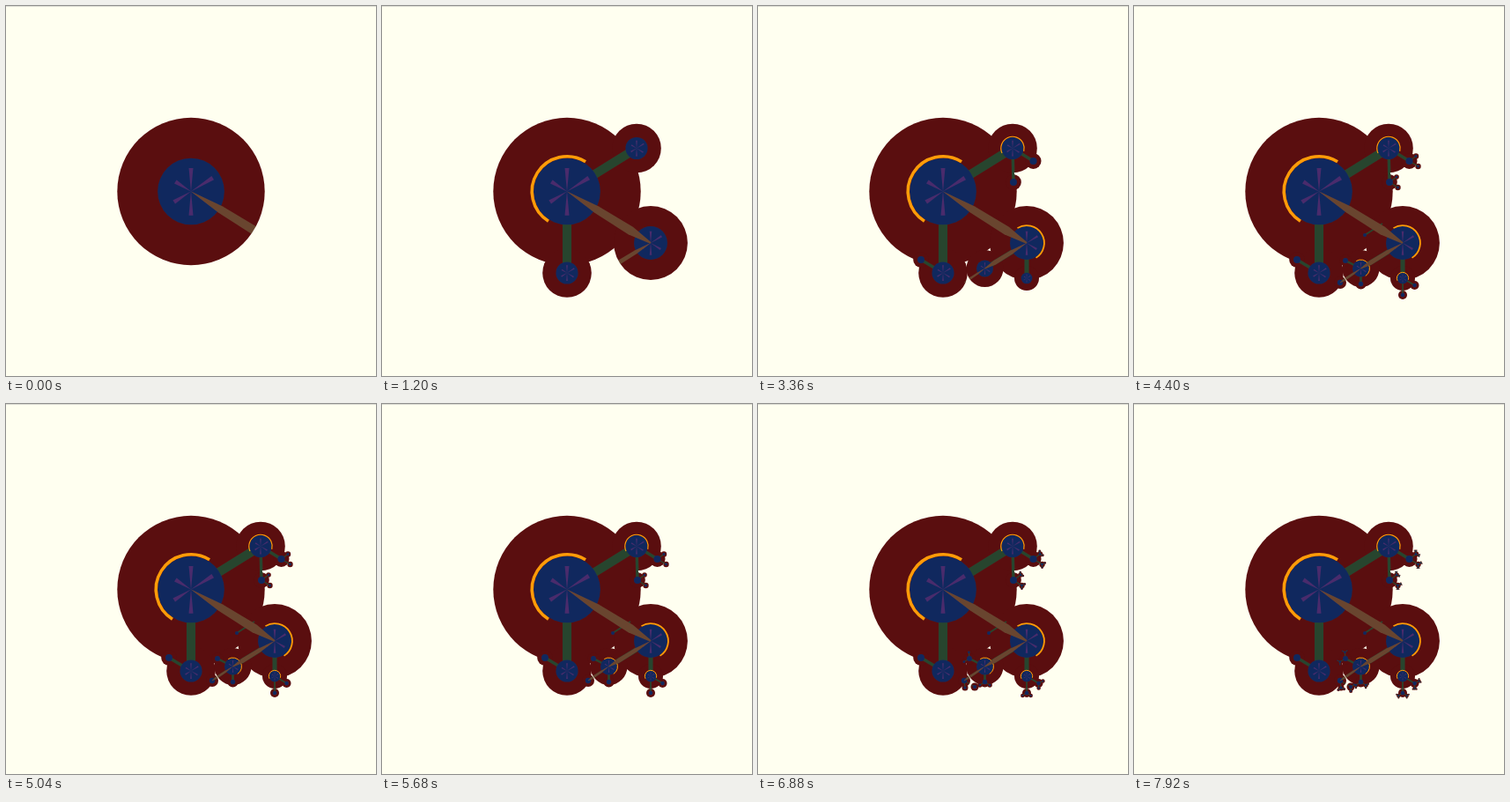
Animation, 420 px wide and 420 px high, one loop 8 s. Source, as an HTML page with a canvas:

```html
<!DOCTYPE html>
<html lang="en">
<head>
<meta charset="utf-8">
<title>Growing discs</title>
<style>
  html, body { margin: 0; width: 100%; height: 100%; overflow: hidden; background: #fffff0; }
  body { box-shadow: inset 0 1px #deded4; }
  canvas { display: block; width: 420px; height: 420px; }
</style>
</head>
<body>
<canvas id="stage" width="420" height="420"></canvas>
<script>
const ctx = document.getElementById('stage').getContext('2d');
const LOOP = 8000, FIRST = 1040, STEP = 1600;
const RED = '#5a0e0f', BLUE = '#10285e', PURPLE = '#4a2b6c';
const BROWN = '#69452f', GREEN = '#27452e', ORANGE = '#ff9c08';
const rad = deg => deg * Math.PI / 180;

// level, x, y, radius, parent index
const nodes = [
  [0, 210, 210.5, 83.7, -1],
  [1, 289, 161.5, 27.8, 0],
  [1, 305, 269, 41.9, 0],
  [1, 210, 303, 27.8, 0],
  [2, 290, 200, 8.8, 1],
  [2, 312.5, 176, 9, 1],
  [2, 257.5, 298, 21, 2],
  [2, 305, 309, 14, 2],
  [2, 185, 288, 8.8, 3],
  [3, 299.5, 206, 3.2, 4],
  [3, 298, 194, 2.8, 4],
  [3, 322.5, 182, 3.2, 5],
  [3, 320, 170.5, 3.2, 5],
  [3, 234, 314, 7, 6],
  [3, 257.5, 315.5, 6, 6],
  [3, 240, 289, 6.5, 6],
  [3, 305, 328, 5, 7],
  [3, 318.5, 317, 5, 7],
  [4, 246, 321, 4.5, 13],
  [4, 235, 322, 3.5, 13]
].map(([level, x, y, r, up]) => ({ level, x, y, r, up }));
nodes.forEach(n => n.up = nodes[n.up]);

// Buds on the outer tips, each turning to both sides of its stem
function sprout(n) {
  const heading = Math.atan2(n.y - n.up.y, n.x - n.up.x);
  for (const turn of [-58, 58]) {
    const a = heading + rad(turn);
    const bud = {
      level: n.level + 1, up: n, r: n.r * 0.45,
      x: n.x + Math.cos(a) * n.r * 1.1,
      y: n.y + Math.sin(a) * n.r * 1.1
    };
    nodes.push(bud);
    if (bud.level < 5) sprout(bud);
  }
}
nodes.filter(n => n.level > 2 && n !== nodes[13]).forEach(sprout);

// Arc angles in degrees for the nodes that carry one
const arcs = [[0, 122, 302], [1, 155, 375], [2, -122, 58], [6, -122, 58], [7, 155, 375]];
const needles = [[0, 2], [2, 6], [6, 13]];
// Star blades: angle, length relative to the disc
const blades = [[-90, 0.7], [-32, 0.77], [32, 0.7], [90, 0.72], [148, 0.6], [212, 0.55]];

function disc(n, r, colour) {
  ctx.fillStyle = colour;
  ctx.beginPath();
  ctx.arc(n.x, n.y, r, 0, 7);
  ctx.fill();
}

function line(x1, y1, x2, y2, width) {
  ctx.strokeStyle = GREEN;
  ctx.lineWidth = width;
  ctx.beginPath();
  ctx.moveTo(x1, y1);
  ctx.lineTo(x2, y2);
  ctx.stroke();
}

// Symmetric blade along +x from [distance, half width] pairs
function blade(x, y, angle, profile, colour) {
  ctx.save();
  ctx.translate(x, y);
  ctx.rotate(angle);
  ctx.fillStyle = colour;
  ctx.beginPath();
  profile.forEach(([d, w]) => ctx.lineTo(d, w));
  [...profile].reverse().forEach(([d, w]) => ctx.lineTo(d, -w));
  ctx.fill();
  ctx.restore();
}

function star(n) {
  const size = n.r * 0.452;
  for (const [deg, len] of blades) {
    const d = size * len;
    blade(n.x, n.y, rad(deg), [[0, 0], [d, size * 0.065]], PURPLE);
  }
}

function needle(a, b) {
  const len = Math.hypot(b.x - a.x, b.y - a.y), w = a.r * 0.06;
  const profile = [[0, 0], [len * 0.35, w * 0.85], [len * 0.76, w], [len, w * 0.2]];
  blade(a.x, a.y, Math.atan2(b.y - a.y, b.x - a.x), profile, BROWN);
}

function draw(level) {
  const shown = nodes.filter(n => n.level <= level);
  ctx.clearRect(0, 0, 420, 420);
  ctx.globalCompositeOperation = 'source-over';
  shown.forEach(n => disc(n, n.r, RED));

  // Everything else is visible only on the red
  ctx.globalCompositeOperation = 'source-atop';
  shown.filter(n => n.up && n !== nodes[2])
    .forEach(n => line(n.up.x, n.up.y, n.x, n.y, Math.max(1, n.up.r * 0.12)));
  if (level > 2) {
    line(282, 247, 262, 260, 1.6);
    disc({ x: 262, y: 260 }, 2, BLUE);
  }
  shown.forEach(n => disc(n, n.r * 0.452, BLUE));
  for (const [i, from, to] of arcs) {
    const n = nodes[i];
    if (n.level >= level) continue;
    ctx.strokeStyle = ORANGE;
    ctx.lineWidth = Math.max(1, n.r * 0.042);
    ctx.beginPath();
    ctx.arc(n.x, n.y, n.r * 0.475, rad(from), rad(to));
    ctx.stroke();
  }
  shown.filter(n => n.r > 12).forEach(star);
  needles.forEach(([a, b]) => {
    if (nodes[a].level <= level) needle(nodes[a], nodes[b]);
  });
}

const start = performance.now();
let current = -1;
function tick() {
  const t = (performance.now() - start) % LOOP;
  const level = Math.max(0, Math.floor((t - FIRST) / STEP) + 1);
  if (level !== current) draw(current = level);
  requestAnimationFrame(tick);
}
tick();
</script>
</body>
</html>
```
